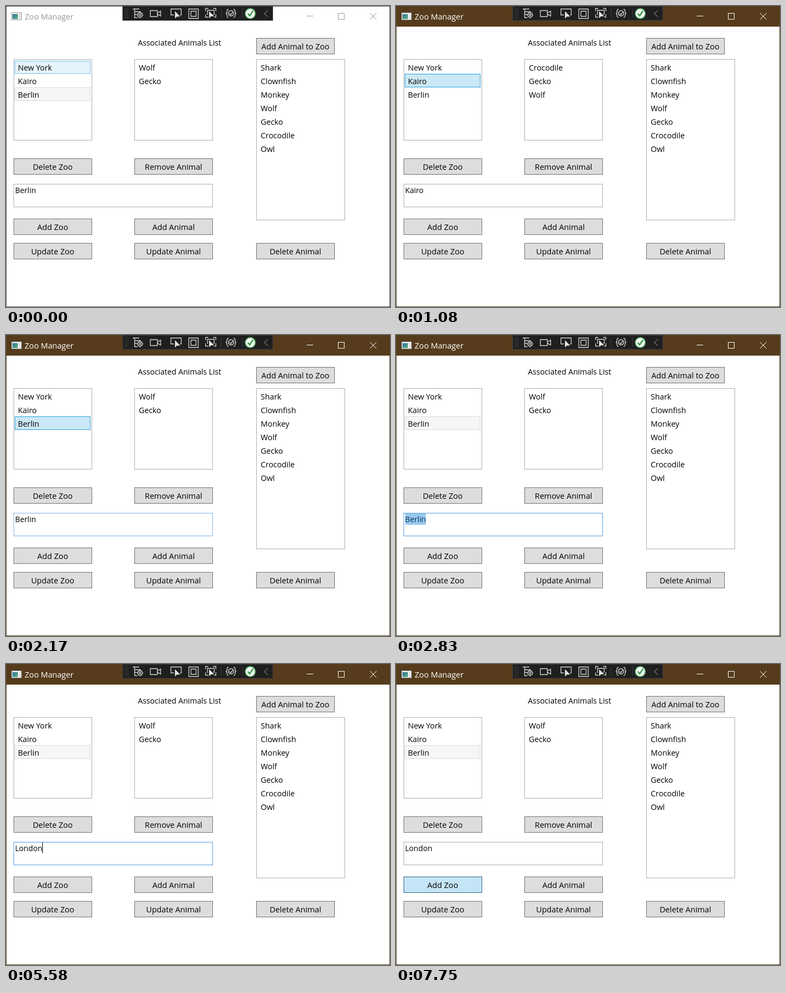
These frames come from a looping animation (709x555 px, 8 s). An HTML page:

```html
<!DOCTYPE html>
<html lang="en">
<head>
<meta charset="utf-8">
<title>Zoo Manager</title>
<style>
html, body { margin: 0; width: 709px; height: 555px; overflow: hidden; background: #fff; }
svg { display: block; }
text { font-family: "Open Sans", "Noto Sans", sans-serif; fill: #000; white-space: pre; }
.item { font-size: 14.35px; }
.button { font-size: 14.6px; text-anchor: middle; }
.label { font-size: 14.2px; }
.field { font-size: 14.1px; }
.title { font-size: 14.6px; }
.box { shape-rendering: crispEdges; stroke-width: 1; }
.icons path, .icons circle { fill: none; stroke: #d8d8d8; stroke-width: 1.3; }
.icons .solid { fill: #e4e4e4; stroke: none; }
</style>
</head>
<body>
<svg id="stage" width="709" height="555" viewBox="0 0 709 555">
  <defs>
    <linearGradient id="pane" x2="1" y2="1">
      <stop offset="0" stop-color="#2f6f9f"/><stop offset="1" stop-color="#5fb57c"/>
    </linearGradient>
    <pattern id="grip" x="219" y="4" width="4" height="4" patternUnits="userSpaceOnUse">
      <path d="M0 0h1v1h-1zM2 2h1v1h-1z" fill="#6a6a6c"/>
    </pattern>
  </defs>
  <rect width="709" height="555" fill="#fff"/>
  <rect id="bar" width="709" height="38"/>
  <rect id="frame" class="box" x=".5" y=".5" width="708" height="554" fill="none"/>

  <g class="box">
    <rect x="10.5" y="12.5" width="18" height="13" fill="#f4f4f4" stroke="#8d9499"/>
    <rect x="12" y="15" width="10" height="9" fill="url(#pane)"/>
    <path d="M24 16.5h3M24 19.5h3M24 22.5h3" stroke="#b5babd"/>
  </g>
  <g id="controls" fill="none" stroke-width="1">
    <path d="M555 18.5h12M613.5 13.5h11v11h-11z" shape-rendering="crispEdges"/>
    <path d="M672 13l12 12M684 13l-12 12"/>
  </g>

  <g class="icons">
    <rect class="box" x="215.5" y=".5" width="277" height="26" fill="#1f1f20" stroke="#3c3c40"/>
    <rect x="219" y="4" width="7" height="20" fill="url(#grip)"/>
    <path d="M234 5.5h12M237.500 6v15.500h5M238 10.500h11M238 15.500h4"/>
    <circle cx="247.500" cy="16.500" r="4"/>
    <circle cx="247.500" cy="16.500" r="1.300"/>
    <path d="M247.500 10.500v2M247.500 20.500v2.500M241.500 16.500h2M251.500 16.500h2M243.500 12.500l1.500 1.500M250 19l1.500 1.500M251.500 12.500l-1.500 1.500M245 19l-1.500 1.500"/>
    <path d="M266.500 8.500h13v11h-13zM279.500 13l6-3.500v9l-6-3.500"/>
    <path d="M310 16.500h-5.500v-11h19v11h-2"/>
    <path class="solid" d="M312 9.500v13.500l3.500-3.500h6z"/>
    <path d="M337.500 5.500h17.500v17.500h-17.500zM341.500 9.500h9.500v9.500h-9.500z"/>
    <path d="M368.500 9.500v-5h5M382.500 4.500h5v5M368.500 15.500v5h5M387.500 15v5.500h-3M373 15.500h-1v-7.500h12.500v7h-2"/>
    <path class="solid" d="M375 9.500v13l3.500-3.500h6z"/>
    <path d="M397.500 5v17M436.500 5v17" style="stroke:#3f3f43;stroke-width:1"/>
    <path d="M411 6c-3 0-3 2-3 4s0 3-2 3.500c2 .5 2 2 2 4s0 3.500 3 3.500M420 6c3 0 3 2 3 4s0 3 2 3.500c-2 .5-2 2-2 4s0 3.500-3 3.500"/>
    <circle cx="415.500" cy="13.500" r="5"/>
    <path d="M412.500 13.500l2.500 3 4-5.500"/>
    <circle cx="451" cy="14" r="9.300" style="fill:#f4f8f4;stroke:#4aa657;stroke-width:1.700"/>
    <path d="M446.500 14l3.500 4 6-9" style="stroke:#2f963f;stroke-width:2.400"/>
    <path d="M483.500 8l-6.500 6 6.500 6" style="stroke:#707073"/>
  </g>
</svg>
<script>
const LOOP = 8000;
const stage = document.getElementById("stage");
const byId = id => document.getElementById(id);

function add(tag, attrs, content = "") {
  const el = document.createElementNS("http://www.w3.org/2000/svg", tag);
  for (const name in attrs) el.setAttribute(name, attrs[name]);
  el.textContent = content;
  return stage.appendChild(el);
}

const box = (x, y, w, h, fill = "#fff", stroke = "#abadb3") =>
  add("rect", { class: "box", x: x + .5, y: y + .5, width: w - 1, height: h - 1, fill, stroke });
const text = (kind, x, y, content) => add("text", { class: kind, x, y }, content);
const paint = (el, [fill, stroke]) => {
  el.setAttribute("fill", fill);
  el.setAttribute("stroke", stroke);
};
const show = (el, on) => el.setAttribute("visibility", on ? "visible" : "hidden");

const ROW = {
  plain: ["none", "none"],
  hover: ["#e5f3fb", "#70c0e7"],
  active: ["#cbe8f6", "#26a0da"],
  idle: ["#f6f6f6", "#dadada"]
};
const BUTTON = {
  plain: ["#dddddd", "#707070"],
  hover: ["#bee6fd", "#3c7fb1"],
  pressed: ["#c4e5f6", "#2c628b"]
};
const FIELD = { plain: "#abadb3", hover: "#7eb4ea", focus: "#569de5" };

function button(x, y, label) {
  const el = box(x, y, 145, 30, ...BUTTON.plain);
  text("button", x + 72.3, y + 21, label);
  return el;
}

const title = text("title", 34.5, 25, "Zoo Manager");
text("label", 243.5, 73, "Associated Animals List");

box(14, 98, 145, 150);
box(237, 98, 145, 150);
box(462, 98, 164, 297);

const rowY = i => 119 + 25 * i;
const zooRows = ["New York", "Kairo", "Berlin"].map((name, i) => {
  const top = i ? 100 + 25 * i : 101;
  const el = box(16, top, 140, 125 + 25 * i - top, "none", "none");
  text("item", 22, rowY(i), name);
  return el;
});
const linked = [0, 1, 2].map(i => text("item", 245.3, rowY(i), ""));
["Shark", "Clownfish", "Monkey", "Wolf", "Gecko", "Crocodile", "Owl"]
  .forEach((name, i) => text("item", 470.3, rowY(i), name));

button(462, 59, "Add Animal to Zoo");
const deleteZoo = button(14, 281, "Delete Zoo");
button(237, 281, "Remove Animal");
const addZoo = button(14, 392, "Add Zoo");
button(237, 392, "Add Animal");
button(14, 437, "Update Zoo");
button(237, 437, "Update Animal");
button(462, 437, "Delete Animal");

const field = box(14, 328, 368, 43);
const typed = text("field", 16.8, 345, "");
const marked = add("rect", { x: 17, y: 329, width: 38, height: 21, fill: "#0078d7", opacity: .4 });
const caret = add("rect", { class: "box", y: 329, width: 1, height: 20, fill: "#000" });

const ANIMALS = {
  "New York": ["Shark", "Clownfish"],
  Kairo: ["Crocodile", "Gecko", "Wolf"],
  Berlin: ["Wolf", "Gecko"]
};

// Each step overrides part of the state before it; caret 0 means hidden.
const STEPS = [
  [0, { awake: false, rows: ["hover", "plain", "idle"], zoo: "Berlin", value: "Berlin",
        field: "plain", del: "plain", add: "plain", marked: false, caret: 0 }],
  [420, { awake: true, rows: ["active", "plain", "plain"], zoo: "New York", value: "New York" }],
  [670, { rows: ["active", "hover", "plain"] }],
  [1080, { rows: ["plain", "active", "plain"], zoo: "Kairo", value: "Kairo" }],
  [1250, { rows: ["plain", "active", "hover"] }],
  [1670, { rows: ["plain", "plain", "active"], zoo: "Berlin", value: "Berlin" }],
  [1830, { del: "hover" }],
  [1920, { del: "plain" }],
  [2170, { field: "hover" }],
  [2750, { field: "focus", rows: ["plain", "plain", "idle"], caret: 54 }],
  [2830, { marked: true, caret: 0 }],
  [4920, { marked: false, value: "L", caret: 24 }],
  [5080, { value: "Lo", caret: 33 }],
  [5330, { value: "Lon", caret: 41 }],
  [5410, { value: "Lond", caret: 50 }],
  [5500, { value: "Londo", caret: 59 }],
  [5580, { value: "London", caret: 67 }],
  [6170, { caret: 0 }],
  [6420, { add: "hover" }],
  [6670, { caret: 67 }],
  [7170, { caret: 0 }],
  [7750, { add: "pressed", field: "plain" }]
];

function draw(time) {
  const s = Object.assign({}, ...STEPS.filter(([at]) => at <= time).map(([, change]) => change));
  byId("bar").setAttribute("fill", s.awake ? "#563c1c" : "#fff");
  byId("frame").setAttribute("stroke", s.awake ? "#563c1c" : "#575550");
  byId("controls").setAttribute("stroke", s.awake ? "#fff" : "#999");
  title.style.fill = s.awake ? "#fff" : "#999";
  zooRows.forEach((el, i) => paint(el, ROW[s.rows[i]]));
  linked.forEach((el, i) => { el.textContent = ANIMALS[s.zoo][i] || ""; });
  paint(deleteZoo, BUTTON[s.del]);
  paint(addZoo, BUTTON[s.add]);
  field.setAttribute("stroke", FIELD[s.field]);
  typed.textContent = s.value;
  show(marked, s.marked);
  caret.setAttribute("x", s.caret);
  show(caret, s.caret > 0);
}

const start = performance.now();
function tick() {
  draw((performance.now() - start) % LOOP);
  requestAnimationFrame(tick);
}
tick();
</script>
</body>
</html>
```
